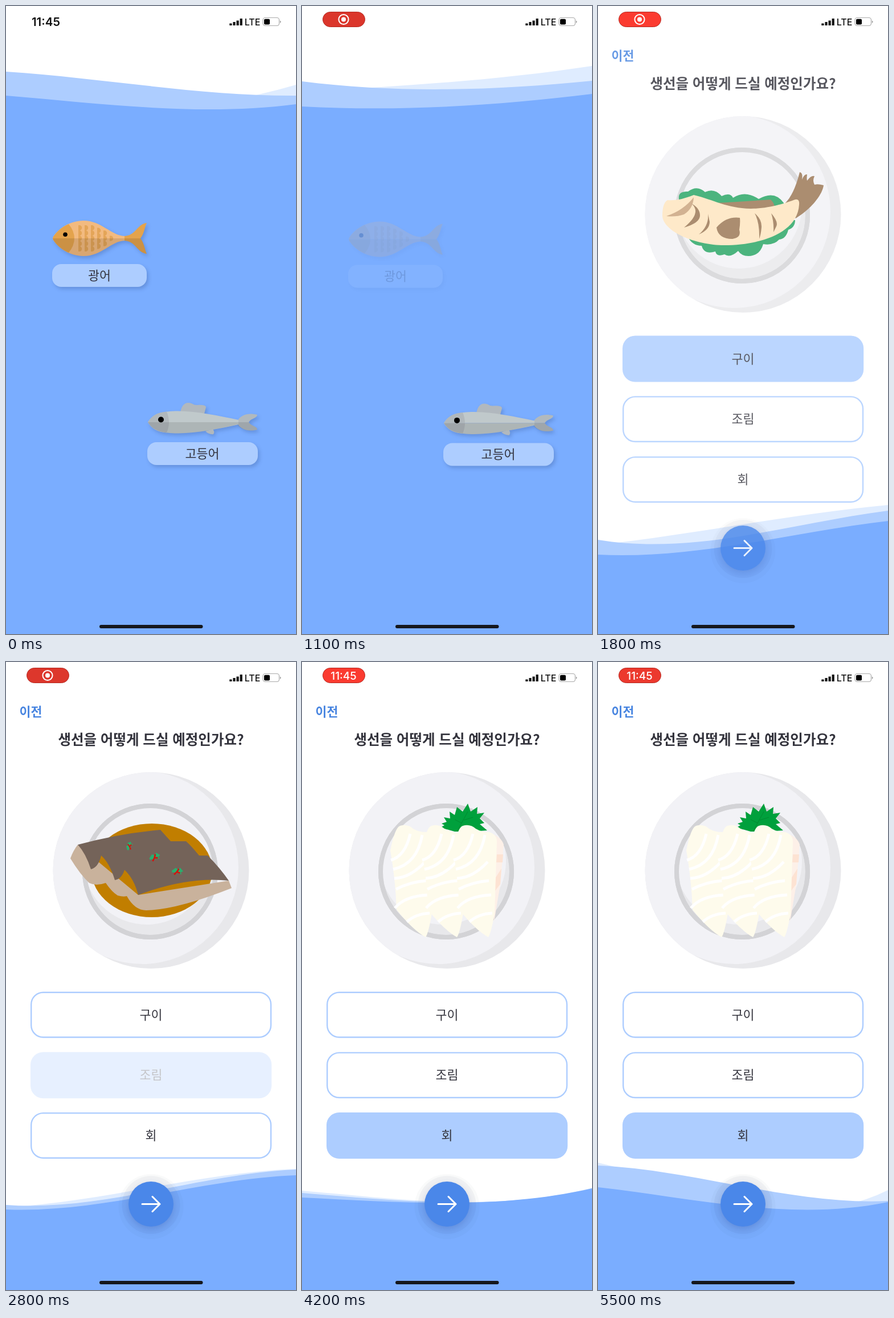
An HTML page that plays this animation: 509 by 1100 pixels, repeating every 5580 ms.

```html
<!DOCTYPE html>
<html lang="ko">
<head>
<meta charset="utf-8">
<style>
html, body { margin: 0; width: 100%; height: 100%; overflow: hidden; background: #fff }
svg { display: block; width: 100vw; height: 100vh }
text { font-family: "Noto Sans CJK KR", "Noto Sans CJK", sans-serif; font-size: 21.7px; fill: #33333c; text-anchor: middle }
.status { font-family: Inter, sans-serif; font-weight: 600; fill: #111 }
.lift { filter: drop-shadow(3px 4px 3px rgba(20, 40, 90, .2)) }
.name { fill: #adcdff }
.option rect { fill: #fff; stroke: #adcdff; stroke-width: 2.4 }
.option.on rect { fill: #adcdff }
</style>
</head>
<body>
<svg viewBox="0 0 509 1100">
  <defs>
    <clipPath id="plateClip"><circle cx="254.5" cy="365" r="172"/></clipPath>
    <clipPath id="bowlClip"><circle cx="253" cy="367" r="112"/></clipPath>
    <g id="flounder">
      <path fill="#f2ba80" d="M82 407 83 404C92 390 112 376 136 376C168 376 184 402 208 403V407Z"/>
      <path fill="#e4a34c" d="M82 407 83 404C89 395 98 387 110 382Q120 394 120 407ZM208 403C228 402 230 382 247 380C243 388 243 398 236 407H208Z"/>
    </g>
    <path id="flounderShade" d="M82 407 83 404C92 390 112 376 136 376C168 376 184 402 208 403C228 402 230 382 247 380C243 388 243 398 236 407Z"/>
    <g id="mackerel">
      <path fill="#b1b9be" d="M406 727C412 716 425 712 441 716C441 722 430 722 426 729H406Z"/>
      <path fill="#c0c9cb" d="M249 729C258 714 275 709.5 302 709.5C335 709.5 375 718 408 725V729Z"/>
      <path fill="#b1b8bc" d="M249 729C256 717 266 712 282 710.5Q286 720 286 729Z"/>
    </g>
    <path id="mackerelShade" d="M249 729C258 714 275 709.5 302 709.5C335 709.5 375 718 406 725C412 716 425 712 441 716C441 722 430 722 426 729Z"/>
    <g id="slice">
      <path fill="#fefbec" d="M155 330Q163 290 172 287Q185 283 195 292Q205 298 219 298Q232 302 232 315L228 440Q222 475 217 482Q195 470 166 434Q164 380 155 330Z"/>
      <path fill="none" stroke="#fff" stroke-width="5" d="M156 347Q181 340 190 301M160 363Q202 354 211 303M162 379Q190 378 216 350M165 398Q190 385 218 383M163 431Q180 410 222 408M184 455Q200 441 224 440"/>
    </g>
    <g id="garnish">
      <path fill="#2aae6e" d="M-10 1-4-5 0-3 4-6 10-1 6 2 8 5 1 4-4 6-5 3-9 4Z"/>
      <path fill="none" stroke="#d8100c" stroke-width="2.6" d="M-5 7-1 2 5 3M-1 2 2-4"/>
    </g>
  </defs>

  <path class="wave" fill="#dfecff"/>
  <path class="wave" fill="#adcdff"/>
  <path class="wave" fill="#7aadff"/>

  <g id="sea">
    <g id="fishA">
      <g class="lift">
        <use href="#flounder"/>
        <use href="#flounder" transform="matrix(1 0 0 -1 0 814)"/>
        <path id="scales" fill="#e4a558"/>
        <use href="#flounderShade" transform="matrix(1 0 0 -1 0 814)" opacity=".11"/>
        <circle cx="104" cy="400.3" r="3.8"/>
      </g>
      <rect class="name lift" x="81" y="452" width="166" height="40" rx="16"/>
      <text x="164" y="479.5">광어</text>
    </g>
    <g class="lift">
      <path fill="#b1b8be" d="M306 712Q309 695 320 695C327 695 328 699 335 699Q351 698 351 703L348 714ZM350 745 354 748Q361 751 364 750Q367 746 363 741Z"/>
      <use href="#mackerel"/>
      <use href="#mackerel" transform="matrix(1 0 0 -1 0 1458)"/>
      <use href="#mackerelShade" transform="matrix(1 0 0 -1 0 1458)" opacity=".1"/>
      <circle cx="272" cy="724.5" r="5"/>
    </g>
    <rect class="name lift" x="248" y="764" width="194" height="40" rx="16"/>
    <text x="344.5" y="791.5">고등어</text>
  </g>

  <g id="menu">
    <text x="43.5" y="95" style="font-weight:700;fill:#4885e0">이전</text>
    <text x="254.5" y="145" style="font-weight:700;font-size:24.5px">생선을 어떻게 드실 예정인가요?</text>

    <circle cx="254.5" cy="365" r="172" fill="#e8e8eb"/>
    <circle cx="239" cy="360" r="169" fill="#f2f2f6" clip-path="url(#plateClip)"/>
    <circle cx="253" cy="367" r="115" fill="#e8e8eb" stroke="#d3d3d6" stroke-width="8"/>
    <g clip-path="url(#bowlClip)"><circle cx="247" cy="349" r="111" fill="#f2f2f6"/></g>
    <circle cx="253" cy="367" r="115" fill="none" stroke="#d3d3d6" stroke-width="8"/>

    <g class="dish">
      <path fill="#25a462" d="M142 338Q140 324 158 325Q174 313 188 326Q204 318 217 333Q232 326 237 336Q258 322 282 338Q310 322 326 345V375H346Q346 388 334 392Q330 408 318 409Q308 420 290 417Q284 438 264 438Q252 438 246 429Q232 442 222 435Q208 440 206 430Q186 436 182 420Q166 420 158 405Z"/>
      <path fill="#997451" d="M203 345Q250 343 303 339Q310 346 310 353Q260 361 203 345ZM326 348C340 335 348 315 354 291Q360 292 358 304Q362 294 367 295Q366 302 367 306Q374 296 380 298Q376 306 380 313Q386 311 396 314C394 330 375 355 347 372Z"/>
      <path fill="#fee5bd" d="M122 340C138 341 150 338 168 331C205 340 225 354 268 355C300 355 330 345 346 339Q354 337 353 348C350 400 280 419 222 419C170 419 115 395 113 368Q113 345 122 340Z"/>
      <path fill="#c8a27a" d="M120 368Q150 358 168 335Q167 355 151 365Q137 370 120 368Z"/>
      <path fill="#997451" d="M164 346Q183 362 151 388Q179 380 179 367Q179 354 164 346ZM193 364Q195 385 177 400Q196 392 196 378ZM249 371Q225 368 208 388Q211 408 236 408Q252 406 248 392Q250 380 249 371ZM275 363Q288 374 287 388Q286 400 283 408Q284 380 275 363ZM304 363Q317 378 313 386L308 396Q309 378 304 363Z"/>
    </g>

    <g class="dish">
      <ellipse cx="256" cy="365" rx="106" ry="82" fill="#c17e00"/>
      <path fill="#c9b29c" d="M126 320Q118 330 113 344Q130 372 146 387Q158 393 175 387Q186 403 196 409Q206 412 212 410Q226 435 246 435Q300 434 396 396L391 383 232 408Z"/>
      <path fill="#746359" d="M126 320Q200 300 271 294Q280 304 289 314H316Q325 322 339 339H354Q375 360 391 383Q320 375 232 408Q225 380 208 364Q203 380 191 382Q182 352 167 339Q162 360 149 363Q140 335 126 320Z"/>
      <use href="#garnish" transform="translate(216 322)rotate(-60)scale(.8)"/>
      <use href="#garnish" transform="translate(261 341)rotate(-12)"/>
      <use href="#garnish" transform="translate(301 366)rotate(8)"/>
    </g>

    <g class="dish">
      <path fill="#00a03c" d="M243 290 250 286 245 283 254 280 249 272 260 274 259 262 268 268 272 254 282 262 291 248 296 262 308 254 307 266 320 264 312 274 320 282 312 284 325 295 296 297 268 297Z"/>
      <path fill="none" stroke="#008a30" d="M272 297 291 262M280 282 268 276M284 277 300 272"/>
      <path fill="#fdf0e8" d="M330 300Q350 306 354 320L348 390 337 455Z"/>
      <path fill="#fde3d3" d="M342 337H353L352 351H341ZM339 379 350 362 348 389 338 402Z"/>
      <use href="#slice"/>
      <use href="#slice" x="55"/>
      <use href="#slice" x="110"/>
    </g>

    <g id="options"></g>

    <circle cx="254.5" cy="954" r="57" fill="#143" opacity=".025"/>
    <circle cx="254.5" cy="951" r="51" fill="#114" opacity=".035"/>
    <circle cx="254.5" cy="949.5" r="39.5" fill="#4a87e9" style="filter:drop-shadow(0 4px 6px rgba(20,40,110,.18))"/>
    <path d="M239 949.5H269M257 936.5 270 949.5 257 962.5" fill="none" stroke="#fff" stroke-width="3" stroke-linecap="round" stroke-linejoin="round"/>
  </g>

  <text id="clock" class="status" x="70" y="35" style="font-size:20.5px">11:45</text>
  <g id="badge">
    <rect id="pill" x="36.5" y="10.5" width="74" height="26" rx="13" stroke="#b52a22"/>
    <g id="record">
      <circle cx="73" cy="23.5" r="8.6" fill="none" stroke="#fff" stroke-width="2"/>
      <circle cx="73" cy="23.5" r="4" fill="#fff"/>
    </g>
    <text id="pillClock" class="status" x="73" y="30.5" style="font-size:19px;font-weight:500;fill:#fff">11:45</text>
  </g>
  <path d="M394.4 30.5V34M400.5 28V34M406.6 25.5V34M412.7 22V34" stroke="#111" stroke-width="4.2"/>
  <text class="status" x="432.5" y="34" style="font-size:16px;font-weight:500">LTE</text>
  <rect x="451" y="20.5" width="28.5" height="14" rx="4" fill="none" stroke="#aaa" stroke-width="1.2"/>
  <rect x="453" y="22.7" width="10" height="9.8" rx="2"/>
  <path d="M481 25.5Q484 27.7 481 30Z" fill="#888"/>
  <rect x="164" y="1084" width="181.5" height="6" rx="3" fill="#15171c"/>
</svg>

<script>
const $ = id => document.getElementById(id);
const all = s => [...document.querySelectorAll(s)];
const LOOP = 5580, STEP = 100;
const ramp = (t, a, b) => Math.min(1, Math.max(0, (t - a) / (b - a)));
const press = (t, down, up, back) => Math.min(ramp(t, down, down + 150), 1 - ramp(t, up, up + back));

$('scales').setAttribute('d', [5, 5, 5, 4, 3, 1].map((n, col) =>
  Array.from({length: n}, (_, i) =>
    `M${127 + col * 11} ${407 + (i - n / 2) * 9.2}h2a4.2 4.6 0 0 1 0 9.2h-2z`).join('')).join(''));

$('options').innerHTML = ['구이', '조림', '회'].map((label, i) =>
  `<g class="option" transform="translate(0 ${i * 105.7})">
    <rect x="44.2" y="578.7" width="420.8" height="78.6" rx="21"/><text x="254.5" y="625.7">${label}</text></g>`).join('');

const waves = all('.wave'), dishes = all('.dish'), options = all('.option');

// Surface heights of each layer (light, mid, front) at four even columns, per key time
const keyTimes = [0, 1100, 1400, 1800, 2800, 4200, 5500];
const heights = [
  [[160, 185, 175, 138], [150, 140, 126, 105], [612, 593, 573, 553], [944, 921, 895, 874],
   [955, 935, 906, 888], [926, 941, 945, 921], [877, 925, 958, 925]],
  [[115, 131, 149, 157], [132, 145, 143.5, 131], [595, 605, 596, 573], [935, 939, 913, 884],
   [951, 942, 911, 889], [930, 943, 945, 923], [882, 903, 933, 944]],
  [[157, 172, 181, 172], [176, 179, 171, 154], [632, 629, 613, 593], [961, 954, 928, 902],
   [959, 948, 919, 899], [938, 946, 945, 922], [920, 943, 959, 946]]
];

function sink(t) {
  const p = ramp(t, 1130, 1605);
  return 790 * p * p * (3 - 2 * p);
}

function wavePath(keys, t) {
  let i = 0;
  while (i < keyTimes.length - 2 && t >= keyTimes[i + 1]) i++;
  const a = keyTimes[i], b = keyTimes[i + 1], p = ramp(t, a, b);
  const [y0, y1, y2, y3] = keys[i].map((y, k) =>
    sink(t) + (y - sink(a)) * (1 - p) + (keys[i + 1][k] - sink(b)) * p);
  const c1 = (-5 * y0 + 18 * y1 - 9 * y2 + 2 * y3) / 6;
  const c2 = (2 * y0 - 9 * y1 + 18 * y2 - 5 * y3) / 6;
  return `M0 ${y0}C170 ${c1} 340 ${c2} 509 ${y3}V1100H0Z`;
}

function draw(t) {
  waves.forEach((w, i) => w.setAttribute('d', wavePath(heights[i], t)));

  const bob = 1.4 * Math.sin(t / 700);
  $('sea').setAttribute('transform', `translate(0 ${sink(t) + Math.max(0, bob)})`);
  $('fishA').setAttribute('opacity', 1 - .83 * press(t, 900, 1200, 285));

  $('menu').setAttribute('opacity', ramp(t, 1500, 1866));
  const chosen = t < 2800 ? 0 : t < 3700 ? 1 : 2;
  const held = [0, press(t, 2550, 2800, 250), press(t, 3450, 3700, 250)];
  options.forEach((o, i) => {
    o.classList.toggle('on', i === chosen);
    o.setAttribute('opacity', 1 - .72 * held[i]);
    dishes[i].style.display = i === chosen ? '' : 'none';
  });

  // Recording badge: two-second pulse, symbol later replaced by the clock
  const glow = -Math.cos(Math.PI * (t - 1000) / 1000);
  const shown = ramp(t, 100, 400), swap = ramp(t, 3700, 4000);
  $('pill').setAttribute('fill', `rgb(${236 + 18 * glow},${57 + 3 * glow},${46 + 3 * glow})`);
  $('badge').setAttribute('opacity', shown);
  $('clock').setAttribute('opacity', 1 - shown);
  $('record').setAttribute('opacity', 1 - swap);
  $('pillClock').setAttribute('opacity', swap);
}

function tick() {
  draw(Math.floor(performance.now() % LOOP / STEP) * STEP);
  requestAnimationFrame(tick);
}
tick();
</script>
</body>
</html>
```
